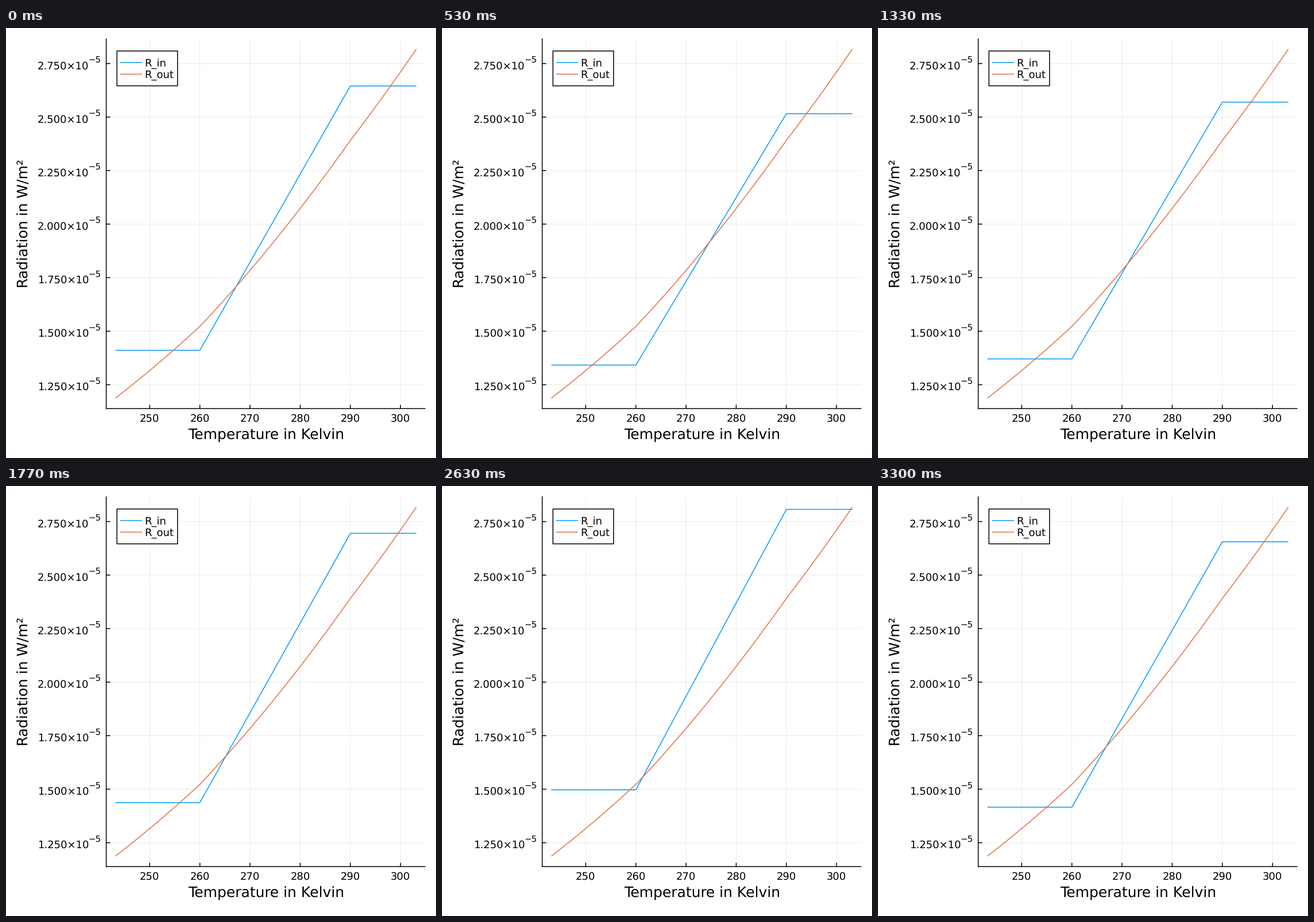
A matplotlib script for the animation above (3.33 s loop, 749x748 px).

```python
import numpy as np
import matplotlib.pyplot as plt
from matplotlib.animation import FuncAnimation
from matplotlib.patches import Rectangle

W, H, DPI = 749, 748, 100
PT = 72 / DPI
LOOP, TICK, STEPS = 3330, 30, 100
BLUE, ORANGE = "#009AFA", "#E36F47"
LEFT, RIGHT, TOP, BOTTOM = 174.6, 730.5, 18.2, 662
T_MIN, T_ICE, T_FREE, T_MAX = 243.15, 260, 290, 303.15

plt.rcParams.update({
    "font.family": "DejaVu Sans",
    "path.snap": False,
    "text.hinting": "none",
    "text.hinting_factor": 1,
})

fig = plt.figure(figsize=(W / DPI, H / DPI), dpi=DPI, facecolor="white")
ax = fig.add_axes([0, 0, 1, 1])
ax.set_xlim(0, W)
ax.set_ylim(H, 0)
ax.axis("off")


def px(temp):
    return 250.3 + 8.738 * (temp - 250)


def py(rad):
    """Pixel row of a radiation value given in 1e-5 W/m²."""
    return 61.8 + 372.5 * (2.75 - rad)


def line(x, y, color="black", width=1.5, **kw):
    kw.setdefault("solid_capstyle", "butt")
    return ax.plot(x, y, color=color, lw=width * PT, **kw)[0]


def label(x, y, text, size, ha="center", **kw):
    return ax.text(x, y, text, fontsize=size * PT, ha=ha, va="baseline", **kw)


def radiation_out(temp):
    """Power laws outside the ice limits, a parabola between them."""
    u = (temp - T_ICE) / (T_FREE - T_ICE)
    cold = 1.5224 * (temp / T_ICE) ** 3.71
    mid = 1.5224 + 0.7427 * u + 0.1258 * u ** 2
    warm = 2.3909 * (temp / T_FREE) ** 3.704
    return np.where(temp < T_ICE, cold, np.where(temp < T_FREE, mid, warm))


def radiation_in(step):
    """Absorbed radiation at the four corner temperatures."""
    high = 2.6553 * (1 - 0.06 * np.sin(2 * np.pi * (step + 1) / STEPS))
    low = high * 0.4 / 0.75
    return np.array([low, low, high, high])


# Grid, ticks and tick labels
for temp in range(250, 301, 10):
    x = px(temp)
    line([x, x], [TOP, BOTTOM], width=0.8, alpha=0.1)
    line([x, x], [BOTTOM, BOTTOM - 6.5])
    label(x, 685, str(temp), 18.4)

for rad in np.arange(1.25, 2.8, 0.25):
    y = py(rad)
    line([LEFT, RIGHT], [y, y], width=0.8, alpha=0.1)
    line([LEFT, LEFT + 7], [y, y])
    label(144.5, y + 9.5, f"{rad:.3f}×10", 18.4, "right")
    label(143.5, y - 1, "−5", 14.5, "left")

line([LEFT, LEFT], [TOP, BOTTOM + 0.75])
line([LEFT - 0.75, RIGHT], [BOTTOM, BOTTOM])
label(453.5, 715, "Temperature in Kelvin", 25.3)
label(38, 340.5, "Radiation in W/m²", 25.3,
      rotation=90, rotation_mode="anchor")

# Curves
corners = px(np.array([T_MIN, T_ICE, T_FREE, T_MAX]))
curve_in = line(corners, py(radiation_in(0)), BLUE)
temps = np.linspace(T_MIN, T_MAX, 241)
line(px(temps), py(radiation_out(temps)), ORANGE)

# Legend
ax.add_patch(Rectangle((193.3, 40), 105.5, 60.6, fc="white", ec="black",
                       lw=1.5 * PT, zorder=3))
for y, name, color in ((60.2, "R_in", BLUE), (80.3, "R_out", ORANGE)):
    line([199, 237], [y, y], color, zorder=4)
    label(241, y + 6.5, name, 18.4, "left", zorder=4)


def update(i):
    # The curve moves in 100 steps per loop, looked up late in each tick
    step = int((i * TICK + 25) * STEPS / LOOP)
    curve_in.set_ydata(py(radiation_in(step)))
    return (curve_in,)


anim = FuncAnimation(fig, update, frames=LOOP // TICK, interval=TICK,
                     repeat=True, repeat_delay=0, blit=False)
plt.show()
```
